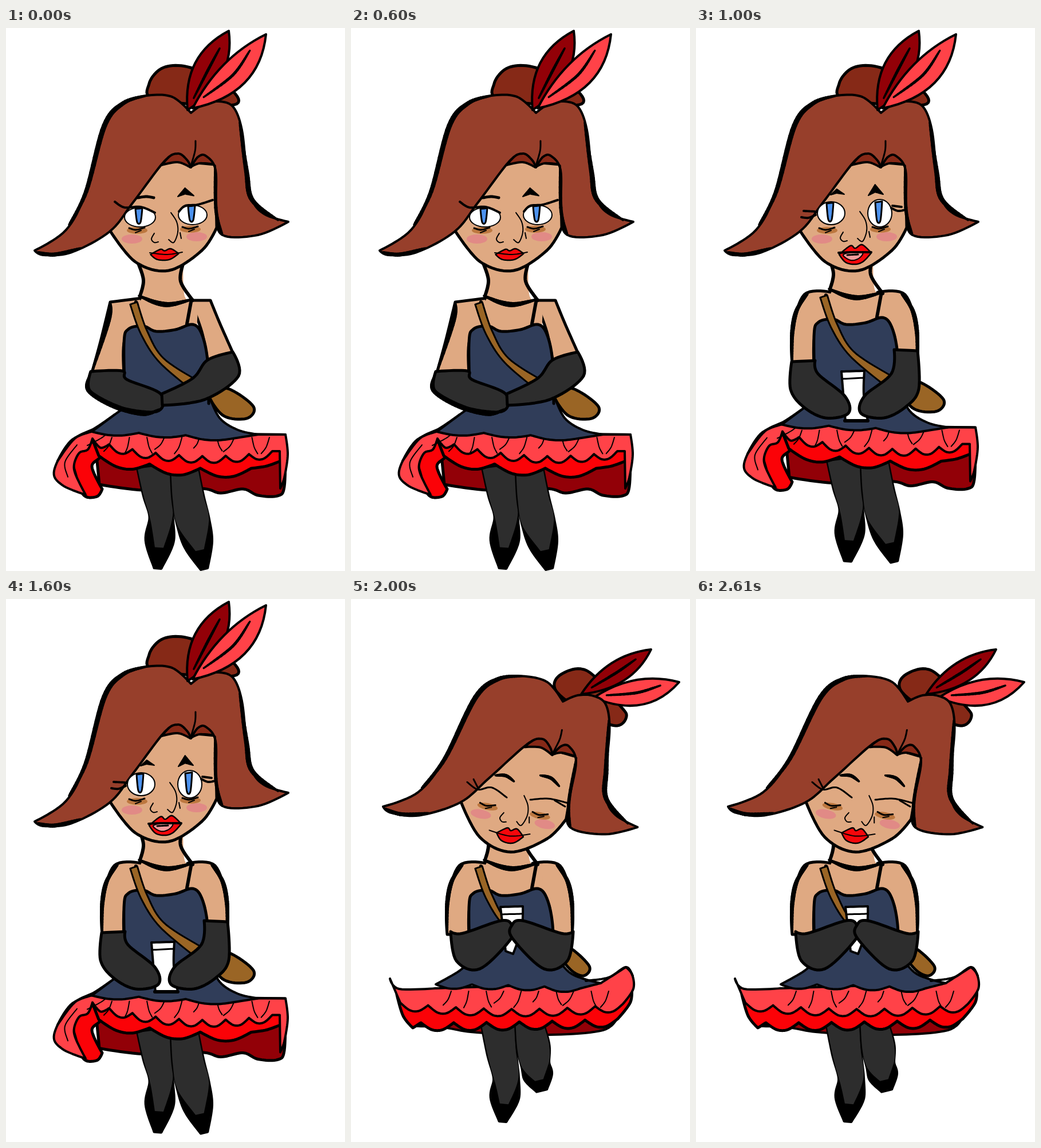
Animation, 592 px wide and 947 px high, one loop 3010 ms. Source, as an HTML page with a canvas:

```html
<!DOCTYPE html>
<html lang="en">
<head>
<meta charset="utf-8">
<title>Girl with a cup</title>
<style>
html, body { margin: 0; width: 100%; height: 100%; overflow: hidden; background: #fff; }
canvas { display: block; }
</style>
</head>
<body>
<canvas id="stage" width="592" height="947"></canvas>
<script>
const ctx = document.getElementById('stage').getContext('2d');
const C = {
  hair: '#973f2b', bun: '#862917', skin: '#dfa982', dress: '#303d59', glove: '#2d2d2d',
  light: '#ff4248', red: '#fb0207', dark: '#920007', bag: '#9a6525', eye: '#4c92ee',
  blush: '#e18a86', shade: '#bd7840', lips: '#f5070b'
};

// ---- drawing tools ----
const mix = (a, b, t) => a + (b - a) * t;
const mixAll = (p, q, t) => p.map((v, k) => mix(v, q[k], t));

// Samples a smooth curve through key points "x,y" or "x,y,width"; "!" marks a sharp corner.
function curve(spec, closed) {
  const words = spec.trim().split(/\s+/), n = words.length, steps = 10;
  const keys = words.map(w => w.replace('!', '').split(',').map(Number));
  const index = i => closed ? (i + n) % n : Math.max(0, Math.min(n - 1, i));
  const slope = i => {
    const a = keys[index(i - 1)], b = keys[index(i + 1)];
    return a.map((v, k) => words[index(i)].endsWith('!') ? 0 : (b[k] - v) / 2);
  };
  const out = [];
  for (let i = 0; i < (closed ? n : n - 1); i++) {
    const p = keys[i], q = keys[index(i + 1)], m = slope(i), r = slope(i + 1);
    for (let s = 0; s < steps; s++) {
      const t = s / steps, u = 1 - t;
      out.push(p.map((v, k) => v * u * u * (1 + 2 * t) + q[k] * t * t * (3 - 2 * t)
        + m[k] * t * u * u - r[k] * t * t * u));
    }
  }
  if (!closed) out.push(keys[n - 1]);
  return out;
}

function path(points, closed) {
  ctx.beginPath();
  points.forEach(p => ctx.lineTo(p[0], p[1]));
  if (closed) ctx.closePath();
}

function paint(fill, width) {
  if (fill) { ctx.fillStyle = fill; ctx.fill(); }
  if (width) { ctx.lineWidth = width; ctx.stroke(); }
}

function shape(fill, width, spec) { path(curve(spec, true), true); paint(fill, width); }
function openShape(fill, width, spec) { path(curve(spec)); paint(fill, width); }
function line(width, ...specs) { for (const s of specs) openShape(null, width, s); }

function oval(fill, width, x, y, rx, ry) {
  ctx.beginPath();
  ctx.ellipse(x, y, rx, ry, 0, 0, Math.PI * 2);
  paint(fill, width);
}

// Pen stroke that swells in the middle.
function swell(max, spec) {
  const pts = curve(spec);
  for (let i = 1; i < pts.length; i++) {
    path([pts[i - 1], pts[i]]);
    paint(null, 3 + (max - 3) * Math.sin(Math.PI * i / pts.length));
  }
}

// Limb around a centre line whose key points carry a width.
function tube(fill, width, spec) {
  const pts = curve(spec), sides = [[], []];
  pts.forEach(([x, y, w], i) => {
    const a = pts[Math.max(0, i - 1)], b = pts[Math.min(pts.length - 1, i + 1)];
    const dx = b[0] - a[0], dy = b[1] - a[1], k = w / 2 / Math.hypot(dx, dy);
    sides[0].push([x + dy * k, y - dx * k]);
    sides[1].unshift([x - dy * k, y + dx * k]);
  });
  path(sides.flat(), true);
  paint(fill, width);
}

// Moves and scales a unit drawing into place.
function place(spec, x, y, w = 1, h = w) {
  return spec.split(' ').map(s => {
    const [u, v] = s.replace('!', '').split(',').map(Number);
    return `${x + u * w},${y + v * h}${s.endsWith('!') ? '!' : ''}`;
  }).join(' ');
}

// Scalloped edge between two points.
function frill(x0, y0, x1, y1, sag, depth, count) {
  return Array.from({ length: count * 3 + 1 }, (_, i) => {
    const t = i / (count * 3);
    const y = mix(y0, y1, t) + sag * 4 * t * (1 - t) + depth * Math.abs(Math.sin(Math.PI * count * t));
    return `${mix(x0, x1, t)},${y}${i % 3 ? '' : '!'}`;
  }).join(' ');
}

function folds(x0, x1, y, count) {
  let seed = 5;
  const rnd = () => (seed = seed * 16807 % 2147483647) / 2147483647;
  for (let i = 0; i < 6; i++) rnd();
  for (let i = 0; i < count; i++) {
    const x = mix(x0, x1, i / (count - 1)), lean = (rnd() - 0.65) * 34, drop = 18 + rnd() * 16;
    line(2, `${x},${y} ${x + lean * 0.4},${y + drop * 0.6} ${x + lean},${y + drop}`);
  }
}

function within(change, draw) {
  ctx.save();
  change();
  draw();
  ctx.restore();
}
const raised = (dy, draw) => within(() => ctx.translate(0, -dy), draw);
const mirrored = (axis, draw) => within(() => { ctx.translate(2 * axis, 0); ctx.scale(-1, 1); }, draw);
const tilted = draw => within(() => {
  ctx.translate(56, 362);
  ctx.rotate(0.193);
  ctx.translate(-50, -388);
}, draw);

// ---- head, always described upright ----
function feather(fill, base, tip, left, right) {
  const dx = tip[0] - base[0], dy = tip[1] - base[1], len = Math.hypot(dx, dy);
  const beside = (t, d) => [mix(base[0], tip[0], t) + dy / len * d, mix(base[1], tip[1], t) - dx / len * d];
  ctx.beginPath();
  ctx.moveTo(...base);
  ctx.quadraticCurveTo(...beside(0.52, left * 2), ...tip);
  ctx.quadraticCurveTo(...beside(0.55, -right * 2), ...base);
  paint(fill, 4);
  swell(5, [beside(0.15, 0), beside(0.5, (left - right) / 2), beside(0.78, 0)].join(' '));
}

function face() {
  shape(C.skin, 5, '182,354! 226,408 284,423 342,388 368,348! 366,238! 275,230! 215,303');
}

function hair() {
  shape(C.bun, 4, '272,239! 300,214 345,217 366,238! 338,236 322,243! 300,234');
  shape(C.hair, 4, `50,388! 105,352 140,285 172,170 205,131 245,118 290,120 323,148! 345,133 372,128 397,138
    412,178 420,250 430,300 452,325 493,338! 440,361 378,361 367,320 366,248 349,223 335,225 323,243!
    316,230 300,219 276,233 222,304 181,355 115,391 66,396`);
  swell(9, '110,343 140,285 172,170 205,131 245,118');
  swell(9, '408,165 420,250 430,300 475,335');
  swell(7, '55,391 85,395 130,384');
  swell(6, '365,240 367,320 378,361');
  line(3, '331,197 330,215 322,243');
}

function cheeks() {
  for (const [x, y] of [[220, 368], [333, 364]]) oval(C.blush, 0, x, y, 18, 8);
  for (const [x, y] of [[229, 353], [322, 351]]) {
    oval(C.shade, 0, x, y, 18, 6);
    line(3, place('-14,-4 -2,-1 13,-5', x, y));
    line(2, place('-3,4 7,0', x, y));
  }
}

function nose(x, y) {
  line(2, ...['0,0 10,16 12,34 5,52 -4,47', '-29,36 -34,46 -29,52 -22,51', '16,35 18,45'].map(s => place(s, x, y)));
}

function eye(x, y, rx, ry, pupil) {
  oval('#fff', 2, x, y, rx, ry);
  shape(C.eye, 3, place('-6,-.5! 6,-.55! 3,.5 -3,.5', x - 2, y - 3, 1, pupil));
}

function brow(x, y, w, h) { shape('#000', 2, place('0,0! .45,-1! 1,-.1! .45,-.3!', x, y, w, h)); }

function lips(x, y, w, h) {
  shape(C.lips, 2.5, place('-.5,0! -.15,-.45 0,-.32 .22,-.5 .5,-.08! .25,.36 0,.5 -.3,.4', x, y, w, h));
}

const lids = ['190,303 207,313 235,312 260,322', '302,320 313,310 335,308 361,300'];

function sadFace() {
  eye(234, 330, 27, 17, 23);
  eye(326, 326, 25, 17, 24);
  line(4, ...lids);
  line(5, '230,296 245,294 258,296');
  brow(300, 294, 28, 15);
  nose(288, 322);
  lips(277, 395, 49, 20);
  line(2, '251,392 281,395 308,391');
}

function openFace() {
  eye(236, 323, 24, 20, 28);
  eye(321, 323, 21, 24, 32);
  line(4, '184,330 196,331 209,326', '188,319 207,320', '341,314 353,319 366,317', '343,310 359,312');
  brow(235, 291, 24, 10);
  brow(301, 292, 26, 19);
  nose(286, 320);
  lips(278, 395, 56, 34);
  shape('#f49a9c', 2, '257,396 272,391 291,392 284,402 270,405');
  line(4, '249,392 272,391 306,391');
  line(3, '264,396 283,395');
}

function happyFace() {
  line(3, '186,318 207,327 230,319 259,331', '300,327 331,319 364,320', '196,311 207,325', '342,320 362,327');
  swell(6, '232,297 250,294 266,301');
  swell(6, '309,282 328,283 345,294');
  nose(288, 322);
  lips(277, 395, 47, 27);
  line(2, '240,393 277,396 311,386');
}

function frontHead(expression) {
  shape(C.bun, 5, '262,125 250,97 275,69 322,69 385,100 398,134');
  face();
  hair();
  feather(C.dark, [317, 143], [389, 5], 26, 25);
  feather(C.light, [326, 140], [454, 11], 15, 33);
  cheeks();
  expression();
}

function tiltedHead() {
  shape(C.bun, 5, '358,160 366,132 412,125 468,184 481,205 462,221 410,200');
  feather(C.dark, [402, 166], [524, 88], 17, 20);
  feather(C.light, [424, 172], [573, 145], 17, 27);
  tilted(() => { face(); hair(); cheeks(); happyFace(); });
}

// ---- body ----
// Hip, calf and ankle are [x, y, width]; the shoe leaves a grey tongue on the instep.
function leg(hip, calf, ankle, toe) {
  const foot = mixAll(ankle, toe, 0.48), instep = mixAll(ankle, toe, 0.6);
  foot[2] = 48;
  instep[2] = 15;
  const shin = [hip, calf, ankle].join(' ');
  tube('#000', 5, `${shin} ${foot} ${toe}`);
  tube(C.glove, 0, `${shin} ${instep}`);
}

function fullSkirt() {
  shape(C.dark, 5, '158,745! 163,796! 240,806 340,803 375,811 414,804 440,815 474,816 486,800 488,730!');
  leg([258, 765, 57], [264, 810, 49], [271, 852, 40], [265, 942, 12]);
  leg([311, 765, 46], [318, 820, 54], [327, 862, 56], [346, 943, 12]);
  shape(C.red, 5, '118,745 150,712! 165,745 150,765 168,804! 159,817 136,815 122,780');
  shape(C.red, 5, `150,715! ${frill(162, 746, 428, 768, 8, 15, 3)} 455,764 480,755! 480,725!`);
  shape(C.light, 4, `150,704! 488,709! 492,744 486,784 479,803! 478,738! ${frill(465, 738, 180, 726, 14, 12, 7)}
    165,732 151,716! 143,735 128,741 119,761 122,780 139,814! 98,797 84,772 112,721`);
  folds(185, 460, 714, 10);
  line(2, '180,705 165,716 142,728', '124,727 103,757 108,783');
  openShape(C.dress, 4, `210,640! 212,657 190,674 150,704! ${frill(150, 704, 396, 716, -2, 6, 3)} 440,709! 405,701 373,680 354,640`);
  line(4, '190,674 155,698 120,716 90,755', '436,709 488,709');
}

function flaredSkirt() {
  shape(C.dark, 4, '110,745! 160,747 220,756 345,760 440,752 466,728! 300,700!');
  leg([256, 735, 58], [263, 790, 50], [271, 835, 43], [265, 911, 12]);
  leg([310, 735, 46], [318, 780, 56], [322, 812, 48], [333, 857, 18]);
  shape(C.red, 5, `80,690! 91,727 108,748! ${frill(122, 739, 466, 732, 2, 14, 6)} 488,703 490,675!`);
  shape(C.light, 4, `68,662! 84,680 148,679! 436,670! 480,642! 491,655 493,680 ${frill(475, 706, 86, 704, 10, 13, 8)}`);
  folds(175, 450, 684, 10);
  openShape(C.dress, 4, `212,625! 190,648 148,672! ${frill(148, 672, 401, 679, -2, 8, 4)} 436,670! 405,662 380,650 355,620`);
  line(4, '410,666 450,660 480,642 492,657');
}

const bag = spec => shape(C.bag, 5, spec);
const lowBag = () => bag('352,632 388,629 432,660 420,681 378,675');

function torso() {
  shape(C.skin, 0, '222,481! 238,468 235,400! 310,400! 312,468 336,479! 332,540! 212,540!');
  line(6, '231,410 240,440 234,468', '309,411 305,442 326,475');
  openShape(C.dress, 5, '208,655 206,550 214,525 240,520 262,529 296,526 326,517 342,534 352,580 354,655');
  line(6, '227,478 238,515', '323,478 316,516');
  swell(9, '232,467 262,479 288,482 326,473');
  tube(C.bag, 3, '223,480,13 241,531,12 272,580,10 335,627,20');
}

const arm = spec => shape(C.skin, 5, spec);
const glove = spec => shape(C.glove, 5, spec);

function roundShoulders() {
  const side = () => {
    arm('189,465 237,461! 232,508 208,535 206,585! 168,585! 168,532');
    swell(8, '195,464 176,492 168,532 168,580');
  };
  side();
  mirrored(277, side);
}

function loweredGlove(cuff) {
  glove(`167,${cuff}! 208,${cuff - 2}! 213,603 260,642 266,672 226,680 188,661 165,630`);
}

function foldedGlove() {
  glove('174,580! 195,583 262,561 281,569 280,592 225,645 184,631');
}

// ---- poses ----
function crossedPose() {
  fullSkirt();
  lowBag();
  arm('182,478! 237,471! 232,520 207,545 206,602! 150,601! 165,547');
  arm('322,475! 357,475! 373,514 396,566! 352,580! 342,530');
  swell(8, '182,478 179,510 150,600');
  torso();
  glove('148,599! 203,598 211,613 270,638 263,669 188,659 146,632');
  swell(9, '146,605 144,632 188,659 240,673 268,665');
  glove('396,565! 352,579 326,611 272,638! 273,658! 347,648 406,607');
  frontHead(sadFace);
}

function cupPose() {
  raised(12.5, () => { fullSkirt(); lowBag(); });
  roundShoulders();
  raised(12, torso);
  shape('#fff', 4, '254,599! 294,598! 293,640 300,685! 261,686!');
  line(3, '256,612 293,610');
  line(6, '260,685 300,685');
  loweredGlove(582);
  mirrored(277, () => loweredGlove(563));
  frontHead(openFace);
}

function sipPose() {
  flaredSkirt();
  bag('365,620 381,608 416,640 407,657 385,648');
  roundShoulders();
  raised(12, torso);
  shape(C.dress, 0, '250,575! 300,560! 330,640! 240,640!');
  shape('#fff', 4, '261,537! 300,536! 298,575 283,619! 270,614!');
  line(3, '263,550 299,549');
  foldedGlove();
  mirrored(281, foldedGlove);
  tiltedHead();
}

const LOOP = 3010;
const poses = [crossedPose, cupPose, sipPose];
const start = performance.now();
let shown = -1;

ctx.lineJoin = ctx.lineCap = 'round';

function tick() {
  const t = (performance.now() - start) % LOOP;
  const pose = Math.min(2, Math.floor(t / 1000));
  if (pose !== shown) {
    shown = pose;
    ctx.fillStyle = '#fff';
    ctx.fillRect(0, 0, 592, 947);
    poses[pose]();
  }
  requestAnimationFrame(tick);
}
tick();
</script>
</body>
</html>
```
